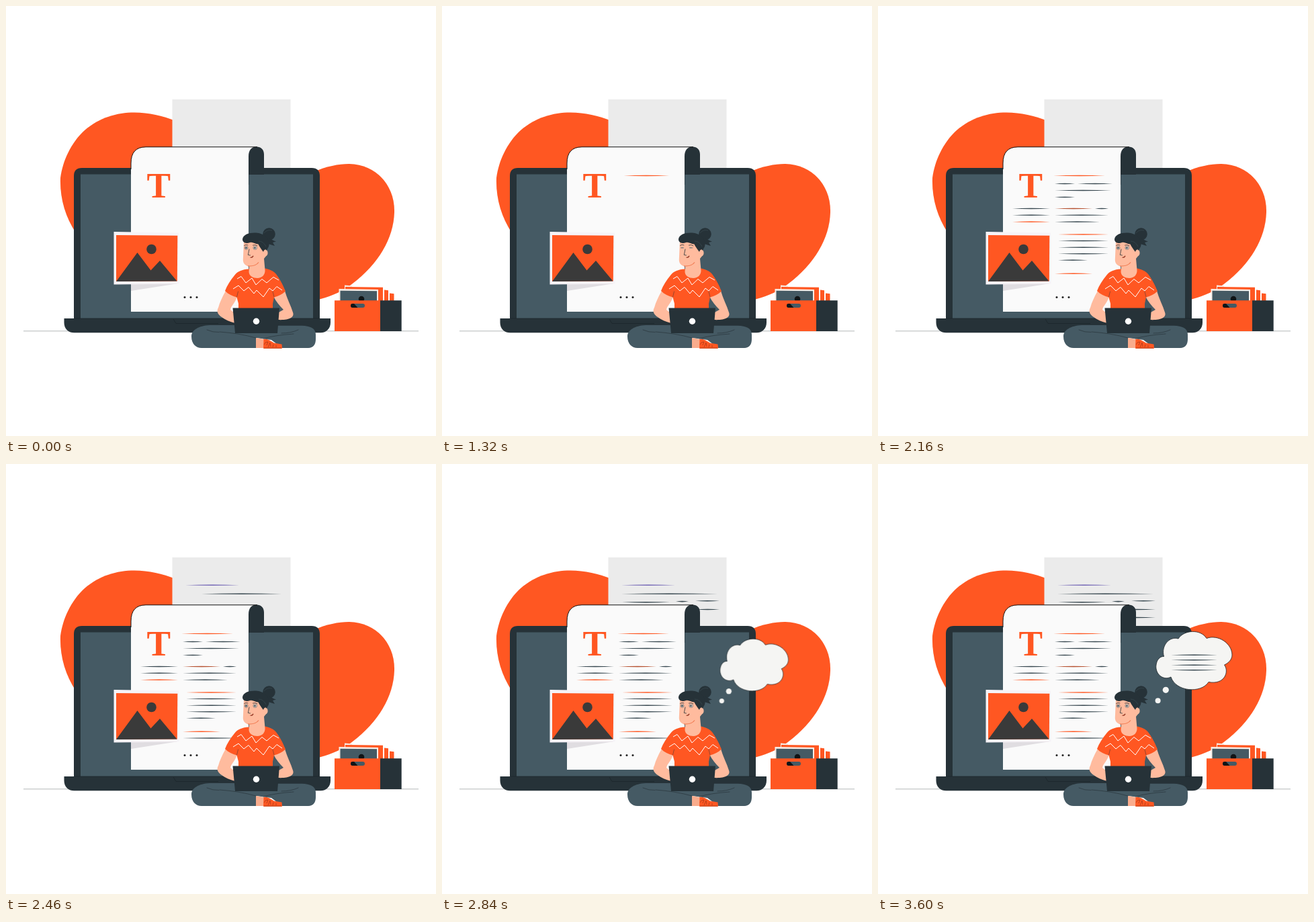
Write an HTML page that moves like this. It is 640x640 px and loops after 3.62 s.

```html
<!DOCTYPE html>
<html lang="en">
<head>
<meta charset="utf-8">
<title>Writing</title>
<style>
  html, body { margin: 0; width: 100%; height: 100%; overflow: hidden; background: #fff; }
  svg { display: block; width: 100%; height: 100%; }
  .orange { fill: #ff5722; }
  .dark { fill: #263238; }
  .slate { fill: #455a64; }
  .skin { fill: #ffbb9e; }
  .cream { fill: #f7ece5; }
  .pen { fill: none; stroke: #263238; stroke-width: .8; stroke-linecap: round; stroke-linejoin: round; }
  .zig { fill: none; stroke: #fff; stroke-width: 1; stroke-linejoin: round; }
  #eyes { transform-origin: 364px 360px; }
  #bubble { transform-origin: 414px 356px; }
</style>
</head>
<body>
<svg viewBox="0 0 640 640" xmlns="http://www.w3.org/2000/svg">
  <rect width="640" height="640" fill="#fff"/>

  <!-- backdrop -->
  <g class="orange">
    <path d="M104 338C88 313 80 286 81 256C84 231 97 203 117 185C139 166 165 158.5 191 158.5C213 159 233 163 252 171L300 250Z"/>
    <path d="M455 248C478 238 496 235 511 235C552 236 579 268 578 307C577 346 554 384 516 413C500 425 484 433 460 438Z"/>
  </g>
  <path d="M26 483.8H614" stroke="#b4b8ba"/>
  <path d="M247.500 139H423.500V245H247.500Z" fill="#ebebeb"/>
  <g id="back"></g>

  <!-- big laptop -->
  <path class="dark" d="M101 468V253Q101 241 113 241H455Q467 241 467 253V468Z"/>
  <path class="slate" d="M111 250.500H457V465H111Z"/>
  <path class="dark" d="M86.500 465H483V471C483 480 477 486.300 468 486.300H101.500C92 486.300 86.500 480 86.500 471Z"/>
  <path d="M102 465H467M249 466L253 472.500H316" fill="none" stroke="#1a2429" stroke-width=".7"/>

  <!-- paper -->
  <path d="M186 455V234Q186 210 208 210H373V240H361V455Z" fill="#fafafa"/>
  <path class="dark" d="M361 266V224C361 214 366 209.500 372.500 209.500C380 209.500 384 214 384 221V251H361.500V266Z"/>
  <path d="M186 243V234Q186 210 208 209.800H374" fill="none" stroke="#111" stroke-width="1"/>
  <text class="orange" x="227.300" y="285" font-family="'Liberation Serif', serif" font-weight="700" font-size="53.300" text-anchor="middle">T</text>
  <g id="front"></g>
  <g fill="#222"><circle cx="266" cy="433.500" r="1.500"/><circle cx="275" cy="433.500" r="1.500"/><circle cx="284" cy="433.500" r="1.500"/></g>

  <!-- picture card -->
  <path d="M186 413H256L186 424Z" fill="#e0dde1"/>
  <path d="M160.500 336L257 337.500L257.500 413.500L160.500 414.500Z" fill="#f6f3f7"/>
  <path class="orange" d="M164 341L255.300 341.800L254.800 409.500L164 410Z"/>
  <path d="M164 410L195.500 367L215.500 393.500L229 379L254.500 409.500Z" fill="#3a3a3a"/>
  <circle cx="216.500" cy="362" r="7.300" fill="#3a3a3a"/>

  <!-- file box -->
  <path class="cream" d="M504 415.500L515 416.500V440H504Z"/>
  <path class="orange" d="M505 418L561 418.700V440H505ZM563 422.500L569 423.300V440H563ZM571 427.500L577.500 428.300V440H571Z"/>
  <path class="cream" d="M495.500 421L554 422V440H495.500Z"/>
  <path class="slate" d="M497.500 423.800L552 424.300V440H497.500Z"/>
  <circle cx="529" cy="436" r="4.300" fill="#101416"/>
  <path class="orange" d="M489 438.200H557.500V484H489Z"/>
  <path class="dark" d="M557 438.200H588.700V484H557Z"/>
  <rect class="slate" x="513" y="443" width="21" height="6" rx="3"/>
  <path d="M516 443H518L523.500 449H516A3 3 0 0 1 516 443Z" fill="#101416"/>

  <!-- woman -->
  <path class="skin" d="M327 424L344 432C342 441 335 446 334 452L341 458V472C333 470 326 467 321 463C315 459 313 454 316 449C318 441 322 433 327 424Z"/>
  <path class="skin" d="M398 432L415 424C418 435 424 446 427 456C430 464 420 468 404 467V457L413 452C407 446 402 440 398 432Z"/>
  <path class="orange" d="M361.500 391.500C352 392 344 395 340 401C334 408 329 416 326 424C331 429 337 432 343.500 433.500L346 443V454H397V443L399 433.500Q409 431 416 424.500C412 415 407 405 402 399C398 394 392 392 385 390.500Z"/>
  <path class="zig" d="M344 406L350 402.500L357 412L366 405L372 415L381 406.500L388 412L398 403.500L406 408"/>
  <path class="zig" d="M338 421L346 416L354 424L361 418.500L369 428L373 423L383 433L392 420L397 424L403 417.500L411 423"/>
  <path d="M343.500 433L345.500 425M399 433L397 425" class="pen" stroke-width=".5" opacity=".6"/>
  <path class="skin" d="M354 350L352.800 378C353 384 357 387 362 387.500L361.500 396C362 402 368 405 374 405C381 405 386 400 385.500 393L384 376L388 371L388 350Z"/>
  <ellipse class="skin" cx="386" cy="367.500" rx="3.600" ry="5"/>
  <path d="M360 386.800Q371 388 376 381.500" fill="none" stroke="#f0784e" stroke-width="1.200"/>
  <g class="dark">
    <circle cx="391.500" cy="339.500" r="9.300"/>
    <path d="M386 347C393 345 397 349 402 350.500L397 352L400 357L390 354Z"/>
    <path d="M352 347C353 340 362 337 372 337.500C384 338 391 346 391.500 354C392 358 389 361 388 364C386 361 384 363 383 366C380 362 377 358 375.500 354.500C370 354 367 350.500 363 352C357 354.500 352 352 352 347Z"/>
  </g>
  <path d="M384 338Q389 332 396 334M376 350Q383 350 387 358" fill="none" stroke="#3d4d55" stroke-width=".6"/>
  <path class="pen" d="M354.500 356.500Q357 354.300 360 355.800M367.500 356Q371 354.500 374 356.800M362 362L360.300 370.500L363.500 371"/>
  <path d="M363.500 374.200Q367 374.700 368 371.800" fill="none" stroke="#8c2f1c" stroke-width="1.100"/>
  <g id="eyes">
    <g fill="#fff3ec" stroke="#263238" stroke-width=".6"><ellipse cx="357.600" cy="360" rx="2.400" ry="2.300"/><ellipse cx="370.700" cy="360" rx="2.700" ry="2.400"/></g>
    <circle class="dark" cx="357.500" cy="360" r="1.200"/><circle class="dark" cx="370.500" cy="360" r="1.200"/>
  </g>
  <path class="slate" d="M341 475H303C287 476 276 482 276 492C276 503 283 509 291 509H372.500V494L395 497L411 509H450C457 509 461 504 461 496V489C461 480 453 476 440 475.800H404L394 481H346Z"/>
  <path class="pen" d="M299 482Q308 486 317 485.500M318 485Q347 487 372 494M383 495Q400 490 428 488M410 487Q424 487 435 482" opacity=".8"/>
  <path d="M372 494L384 496V509H372Z" fill="#f9ac8d"/>
  <path class="orange" d="M383.500 496C390 495 394 499 399 501.500L410.500 503.500L411 509.700H383Z"/>
  <path d="M384 504Q386 499 390 500L388 505M390 508L393 501L394 507M397 508L398 503.500M402 508V505M384 509H410" fill="none" stroke="#a63a18" stroke-width=".8"/>
  <path class="dark" d="M337.500 449.500H407L404 487H341Z"/>
  <circle cx="372.500" cy="469.200" r="4.700" fill="#fff"/>

  <!-- thought -->
  <g id="bubble">
    <path d="M425.500 286.500C421 270 434 256 447 260C455 247 480 245 489 259.500C506 253 527 267 527 284C527 291 522 296 515.500 299C523 309 516 329 492 324.500C481 342 443 339 436 317C424 323 412 312 414 299C415 291 420 286 425.500 286.500Z" fill="#f5f5f3" stroke="#1d2529" stroke-width=".8"/>
    <circle cx="428.300" cy="336.300" r="4.600" fill="#f5f5f3"/>
    <circle cx="416.600" cy="352.300" r="4" fill="#f5f5f3"/>
  </g>
  <g id="thought"></g>
</svg>
<script>
const LOOP = 3620;
const $ = id => document.getElementById(id);

// steps: [time, transform, easing?]
function play(el, steps) {
  const first = steps[0], last = steps[steps.length - 1];
  const frames = [[0, first[1]], ...steps, [LOOP, last[1]]].map(([t, transform, easing = 'linear']) =>
    ({ offset: t / LOOP, transform, easing }));
  el.animate(frames, { duration: LOOP, iterations: Infinity }).startTime = 0;
}

// Tapered rule that grows from its right end.
function rule(group, [x0, x1, y, color = '#37474f'], start, dur) {
  const p = document.createElementNS('http://www.w3.org/2000/svg', 'path');
  const m = (x0 + x1) / 2;
  p.setAttribute('d', `M${x0} ${y}Q${m} ${y - 1.6} ${x1} ${y}Q${m} ${y + 1.6} ${x0} ${y}Z`);
  p.setAttribute('fill', color);
  p.style.transformOrigin = `${x1}px ${y}px`;
  $(group).append(p);
  play(p, [[start, 'scaleX(0)'], [start + dur, 'scaleX(1)']]);
}

function write(group, rules, start, step, dur) {
  rules.forEach((r, i) => rule(group, r, start + i * step, dur));
}

const O = '#ff5722';
write('front', [
  [261, 338, 252.5, O],
  [263, 293, 264.5], [297, 349, 264.5],
  [263, 347, 274.5], [263, 293, 284.5],
  [200, 256, 301.5], [263, 319, 301.5, '#b5502f'], [323, 343, 301.5],
  [200, 256, 311.3], [263, 343, 311.3],
  [200, 256, 321.3, O],
  [268, 343, 340, O], [263, 330, 321.3],
  [268, 343, 349.5], [268, 343, 359.3], [268, 343, 368.8], [268, 312, 378.3],
  [263, 319, 398.3, O]
], 1280, 46.7, 46.7);
write('front', [[263, 347, 408]], 2165, 0, 95);
write('back', [
  [267, 347, 180.3, '#7265b5'], [267, 410, 193.3],
  [268, 339, 205.8], [348, 367, 204.6], [377, 413, 203.8],
  [356, 413, 216.5], [356, 413, 228.5]
], 2282, 100, 95);
write('thought', [284.3, 291.8, 299.2, 306.7].map(y => [436, 505, y]), 3100, 120, 95);

play($('eyes'), [
  [960, 'scaleY(1)', 'ease-in'], [1160, 'scaleY(.25)'],
  [1360, 'scaleY(.25)', 'ease-out'], [1480, 'scaleY(1)']
]);
play($('bubble'), [
  [2600, 'scale(0)', 'cubic-bezier(.33,0,.67,1)'], [2900, 'scale(1)']
]);
</script>
</body>
</html>
```
